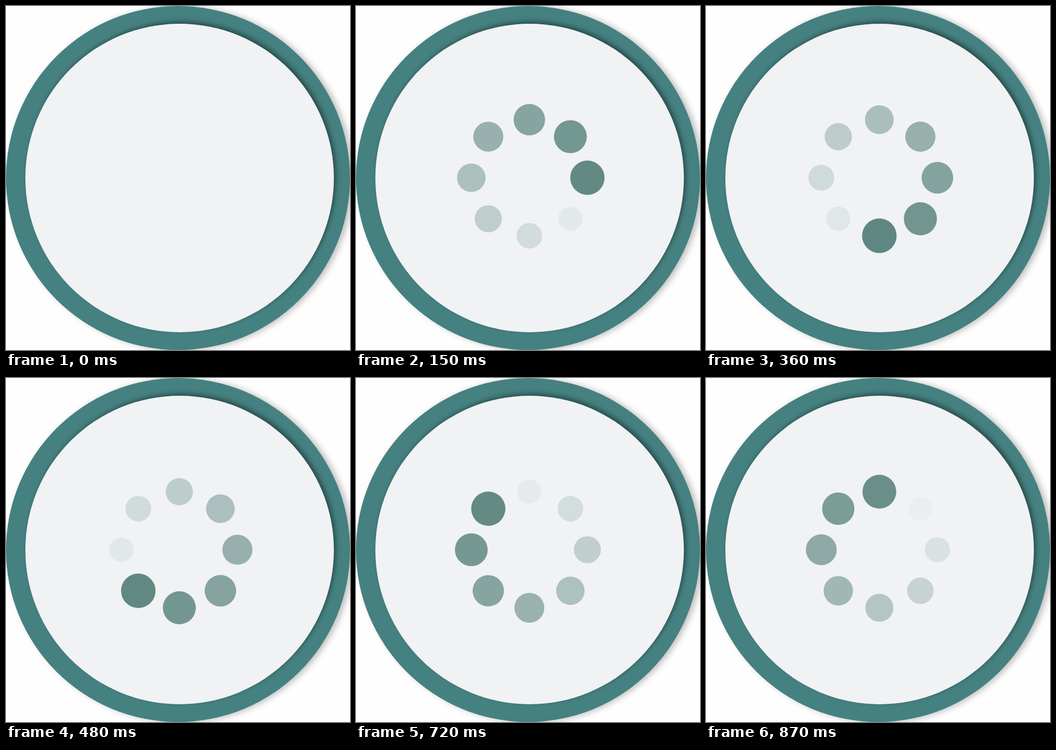
These frames come from a looping animation (640 px wide and 640 px high, 0.9 s). An HTML page:

```html
<!DOCTYPE html>
<html lang="en">
<head>
<meta charset="utf-8">
<title>Loading spinner</title>
<style>
  html, body { margin: 0; width: 100%; height: 100%; overflow: hidden; background: #fefefe; }
  .stage { position: relative; width: 640px; height: 640px; overflow: hidden; }
  .stage div { position: absolute; border-radius: 50%; }
  .ring { inset: 0; background: #458180; box-shadow: 6px 1px 12px rgba(0, 0, 0, .25); }
  .disc { left: 36px; top: 33px; width: 574px; height: 574px; background: #f0f2f4;
          box-shadow: 4px -4px 8px rgba(0, 0, 0, .4); }
  svg { position: absolute; inset: 0; }
</style>
</head>
<body>
<div class="stage">
  <div class="ring"></div>
  <div class="disc"></div>
  <svg id="dots" width="640" height="640" viewBox="0 0 640 640" fill="#5c857e"></svg>
</div>
<script>
  const LOOP = 900, STEP = 30, STEPS = LOOP / STEP;
  const COUNT = 8, CX = 322.5, CY = 319.5, ORBIT = 108, RADIUS = 21.6;
  const group = document.getElementById('dots');

  const dots = Array.from({ length: COUNT }, (_, i) => {
    const dot = document.createElementNS('http://www.w3.org/2000/svg', 'circle');
    const angle = i / COUNT * 2 * Math.PI;
    dot.setAttribute('cx', CX + ORBIT * Math.cos(angle));
    dot.setAttribute('cy', CY + ORBIT * Math.sin(angle));
    group.append(dot);
    return dot;
  });

  // Each dot shrinks from 1.5x to 1x while fading out; the dots start in turn.
  function draw(time) {
    const step = Math.floor(time % LOOP / STEP);
    group.style.visibility = step ? 'visible' : 'hidden';
    dots.forEach((dot, i) => {
      const age = (step / STEPS - (i + 1) / COUNT + 1) % 1;
      dot.setAttribute('r', RADIUS * (1.5 - 0.5 * age));
      dot.setAttribute('opacity', 1 - age);
    });
  }

  const start = performance.now();
  function tick() {
    draw(performance.now() - start);
    requestAnimationFrame(tick);
  }
  tick();
</script>
</body>
</html>
```
